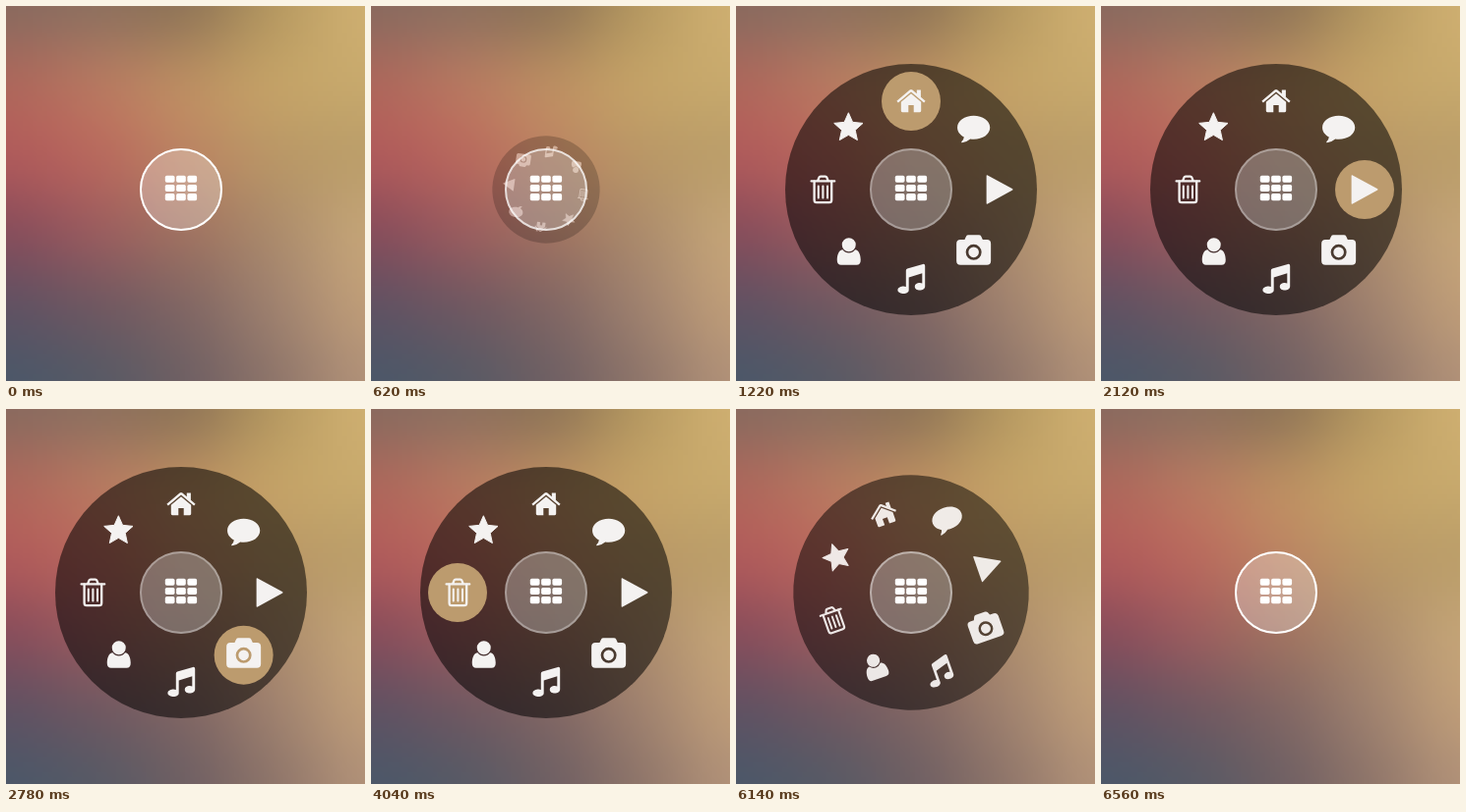
Animation, 365 px wide and 382 px high, one loop 7280 ms. Source, as an HTML page with a canvas:

```html
<!DOCTYPE html>
<html lang="en">
<head>
<meta charset="utf-8">
<title>Radial menu</title>
<style>
html, body { margin: 0; width: 100%; height: 100%; overflow: hidden; background: #9a7464; }
canvas, svg { position: absolute; left: 0; top: 0; width: 100%; height: 100%; display: block; }
</style>
</head>
<body>
<canvas id="back" width="73" height="77"></canvas>
<svg id="stage" viewBox="0 0 365 382"></svg>
<script>
const NS = 'http://www.w3.org/2000/svg';
const LOOP = 7280, TICK = 60;
const CX = 178, CY = 187, ORBIT = 90;
const OPEN = 463, CLOSE = 6077, DUR = 385;

// [start, highlighted item], -1 for none
const HOVERS = [
  [1220, 0], [1640, -1], [1700, 1], [2120, 2], [2780, 3], [3260, 4],
  [3560, 5], [3980, -1], [4040, 6], [4400, 7], [4880, 0], [5480, -1]
];

function el(parent, tag, attrs) {
  const node = document.createElementNS(NS, tag);
  for (const key in attrs) node.setAttribute(key, attrs[key]);
  return parent.appendChild(node);
}

// Soft backdrop: gaussian blend of a coarse mesh of tones
function paintBackdrop() {
  const mesh = [
    '84695f 8a7060 856d53 b5985f d3b374',
    'b0665a bd7c62 c29463 c8a768 c9ab6e',
    'b3595a bc665c bd8463 b99865 b89c68',
    '84495a 9f5c5f a0725f a98a6c caaa7b',
    '5d5163 6f5660 7f6563 a08270 c5a279',
    '48586a 535a66 6c5d62 8b7268 b3937a'
  ].map(row => row.split(' ').map(hex =>
    [0, 2, 4].map(i => parseInt(hex.substr(i, 2), 16))));
  const canvas = document.getElementById('back');
  const ctx = canvas.getContext('2d');
  const { width: w, height: h } = canvas;
  const img = ctx.createImageData(w, h);
  for (let y = 0; y < h; y++) {
    for (let x = 0; x < w; x++) {
      const u = x / (w - 1) * 4, v = y / (h - 1) * 5;
      const sum = [0, 0, 0];
      let total = 0;
      mesh.forEach((row, j) => row.forEach((tone, i) => {
        const weight = Math.exp(-((u - i) ** 2 + (v - j) ** 2) / 0.6);
        total += weight;
        tone.forEach((c, k) => { sum[k] += c * weight; });
      }));
      const at = (y * w + x) * 4;
      sum.forEach((c, k) => { img.data[at + k] = c / total; });
      img.data[at + 3] = 255;
    }
  }
  ctx.putImageData(img, 0, 0);
}

function starPath(outer, inner) {
  const pts = [];
  for (let i = 0; i < 10; i++) {
    const r = i % 2 ? inner : outer, a = (i * 36 - 90) * Math.PI / 180;
    pts.push((r * Math.cos(a)).toFixed(2) + ' ' + (r * Math.sin(a) + 0.8).toFixed(2));
  }
  return 'M' + pts.join('L') + 'Z';
}

const disc = (x, y, r) =>
  `M${x - r} ${y}a${r} ${r} 0 1 0 ${2 * r} 0a${r} ${r} 0 1 0 ${-2 * r} 0Z`;

const path = (g, d, attrs) => el(g, 'path', { d, ...attrs });
const outline = { fill: 'none', stroke: '#f4f2f1', 'stroke-linecap': 'round', 'stroke-linejoin': 'round' };

// Clockwise from the top, each drawn around its own centre
const ICONS = [
  function home(g) {
    path(g, 'M-14.6-.3L-1.4-11.4Q0-12.5 1.4-11.4L5.8-7.7V-11.4H9.9V-4.2L14.6-.3L13.1 1.5L0-9.4L-13.1 1.5Z');
    path(g, 'M0-7.7L10.2.8V9.8Q10.2 11.2 8.8 11.2H2.7V4H-2.7V11.2H-8.8Q-10.2 11.2-10.2 9.8V.8Z');
  },
  function comment(g) {
    path(g, 'M0-11.6C9.2-11.6 16.6-6.6 16.6.4S9.2 12.4 0 12.4Q-1.8 12.4-3.4 12.1Q-7 15.2-11.8 15.9Q-13 15.7-12.2 14.6Q-10 12.4-9.8 10.2C-13.8 8-16.6 4.7-16.6.4C-16.6-6.6-9.2-11.6 0-11.6Z');
  },
  function play(g) {
    path(g, 'M-12.6-14.8L13.2-.7Q13.8 0 13.2.5L-12.6 14.8Q-13.4 15-13.4 14V-14Q-13.4-15-12.6-14.8Z');
  },
  function camera(g) {
    path(g, 'M-13.4-12.6H-9.2L-7.7-15.9Q-7-17.3-5.3-17.3H5.3Q7-17.3 7.7-15.9L9.2-12.6H13.4Q17.5-12.6 17.5-8.5V9Q17.5 13.1 13.4 13.1H-13.4Q-17.5 13.1-17.5 9V-8.5Q-17.5-12.6-13.4-12.6Z'
      + disc(0, 0.2, 8) + disc(0, 0.2, 5.3), { 'fill-rule': 'evenodd' });
  },
  function music(g) {
    path(g, 'M-5.2-7.6Q-5.2-9 -3.8-9.4L12-14.1Q14.2-14.4 14.2-12.3V8.6C14.2 11.3 11.6 12.6 8.9 12.6S3.8 11.4 3.8 8.8S6.3 5 8.9 5Q10.1 5 11.3 5.5V-4.7L-2.3-.6V12.2C-2.3 14.8-4.9 16-7.6 16S-13.6 14.8-13.6 12.2S-10.2 8.4-7.6 8.4Q-6.4 8.4-5.2 8.9Z');
  },
  function user(g) {
    path(g, disc(0.4, -7.4, 7));
    path(g, 'M-5.9-2.4Q-3.4.8.4.8T6.7-2.4C10.6-2.2 12.4 3 12.4 8.2Q12.4 13.2 8.2 13.2H-7.4Q-11.6 13.2-11.6 8.2C-11.6 3-9.8-2.2-5.9-2.4Z');
  },
  function trash(g) {
    path(g, 'M-11.4-8.6H12.2M-4.9-9L-3.5-12.4Q-3-13.4-2-13.4H2.8Q3.8-13.4 4.3-12.4L5.7-9', { ...outline, 'stroke-width': 2.3 });
    path(g, 'M-8.4-8.4V10.4Q-8.4 13.1-6 13.1H6.8Q9.2 13.1 9.2 10.4V-8.4', { ...outline, 'stroke-width': 2.3 });
    path(g, 'M-4.2-3.6V8.4M.4-3.6V8.4M5-3.6V8.4', { ...outline, 'stroke-width': 2 });
  },
  function star(g) {
    path(g, starPath(15.4, 7.2), { stroke: '#f4f2f1', 'stroke-width': 1, 'stroke-linejoin': 'round' });
  }
];

const stage = document.getElementById('stage');
const wheel = el(stage, 'g', {});
el(wheel, 'circle', { r: 128, fill: '#000', 'fill-opacity': 0.54 });
const spots = ICONS.map((draw, i) => {
  const a = (i * 45 - 90) * Math.PI / 180;
  const g = el(wheel, 'g', {
    transform: `translate(${ORBIT * Math.cos(a)} ${ORBIT * Math.sin(a)})`, fill: '#f4f2f1'
  });
  const spot = el(g, 'circle', { r: 30, fill: '#bc9b6e' });
  draw(g);
  return spot;
});

el(stage, 'circle', { cx: CX, cy: CY, r: 42, fill: '#fff', 'fill-opacity': 0.28 });
const rim = el(stage, 'circle', { cx: CX, cy: CY, r: 41, fill: 'none', stroke: '#fff', 'stroke-width': 2 });
for (let i = 0; i < 9; i++) {
  el(stage, 'rect', {
    x: 161.8 + (i % 3) * 11.3, y: 172.7 + Math.floor(i / 3) * 9.2,
    width: 9.7, height: 7.1, rx: 1.7, fill: '#fff'
  });
}

const clamp = v => Math.min(1, Math.max(0, v));
const ease = v => v * v * (3 - 2 * v);

function render(ms) {
  // the picture advances in fixed ticks
  const t = Math.floor((ms + 40) / TICK) * TICK - 40;
  const phase = t < CLOSE ? clamp((t - OPEN) / DUR) : 1 - clamp((t - CLOSE) / DUR);
  const p = t < CLOSE ? ease(phase) : 1 - ease(1 - phase);
  wheel.setAttribute('transform',
    `translate(${CX} ${CY}) rotate(${-270 * (1 - p)}) scale(${0.1 + 0.9 * p})`);
  wheel.setAttribute('opacity', p);
  rim.setAttribute('stroke-opacity', 1 - 0.68 * phase);

  let active = -1;
  for (const [start, item] of HOVERS) if (t >= start) active = item;
  spots.forEach((spot, i) => spot.setAttribute('visibility', i === active ? 'visible' : 'hidden'));
}

paintBackdrop();
const begin = performance.now();
function frame() {
  render((performance.now() - begin) % LOOP);
  requestAnimationFrame(frame);
}
frame();
</script>
</body>
</html>
```
